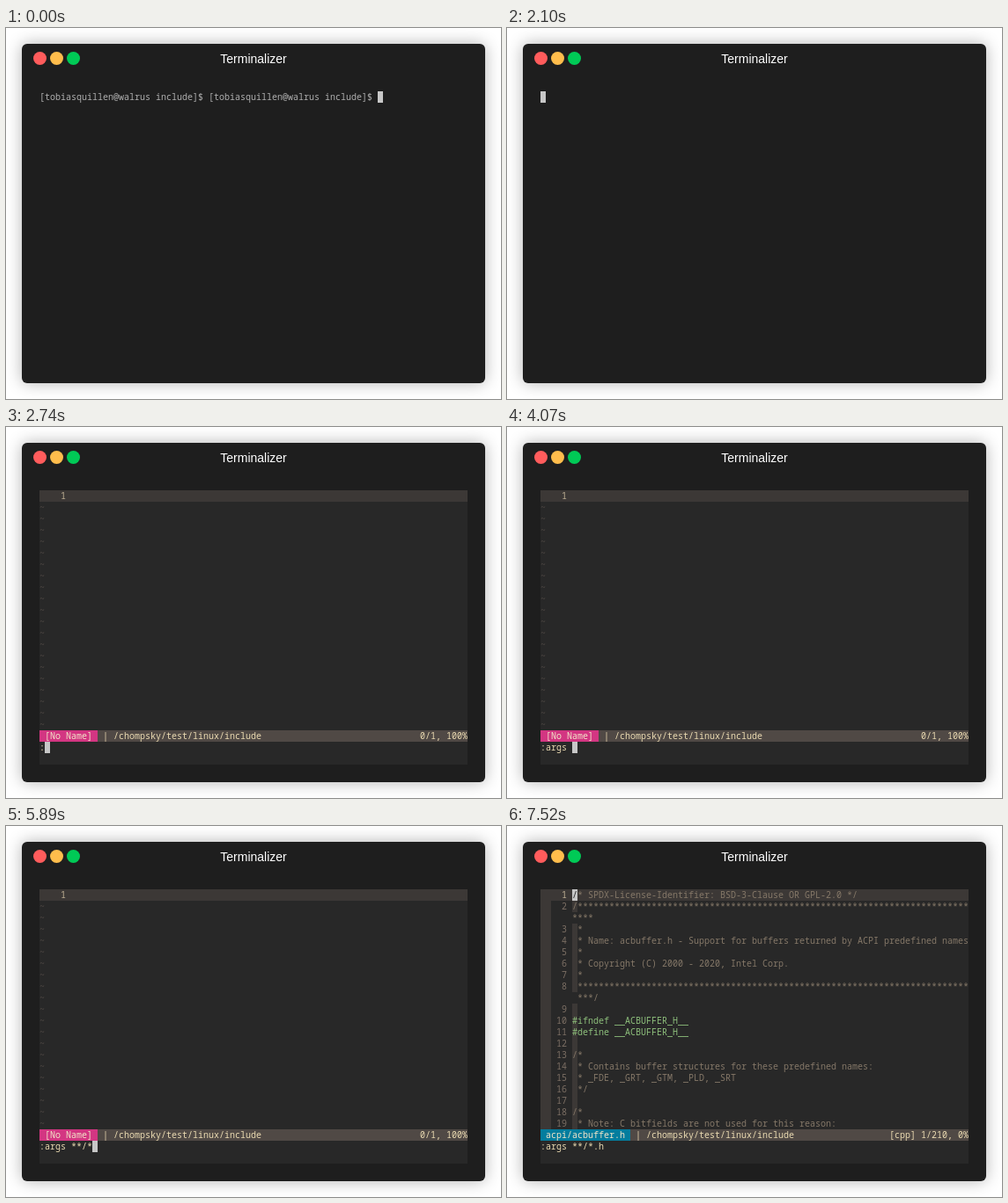
An HTML page for the animation above (8000 ms loop, 562x422 px).

```html
<!DOCTYPE html>
<html lang="en">
<head>
<meta charset="utf-8">
<title>Terminal</title>
<style>
  html, body { margin: 0; width: 100%; height: 100%; overflow: hidden; background: #fff; }
  #window {
    position: absolute; left: 18px; top: 18px; width: 526px; height: 386px;
    border-radius: 6px; background: #1e1e1e; box-shadow: 0 0 18px rgba(0, 0, 0, .3);
  }
  #window i { position: absolute; top: 9px; width: 15px; height: 15px; border-radius: 50%; }
  #title {
    position: absolute; left: 0; right: 0; top: 7px; text-align: center; color: #fff;
    font: 14px/20px "Liberation Sans", Arial, sans-serif;
  }
  #screen {
    position: absolute; left: 20px; top: 54px; width: 486px; height: 312px; overflow: hidden;
    font: 10px/13px "Noto Sans Mono", "DejaVu Sans Mono", monospace;
  }
  #screen span { position: absolute; height: 13px; white-space: pre; }
</style>
</head>
<body>
<div id="window">
  <i style="left:13px;background:#ff5c5c"></i>
  <i style="left:32px;background:#ffbd4c"></i>
  <i style="left:51px;background:#00ca56"></i>
  <div id="title">Terminalizer</div>
  <div id="screen"></div>
</div>
<script>
const LOOP = 8000, COLS = 81, CELL_W = 6, CELL_H = 13, STATUS_ROW = 21, CMD_ROW = 22;
const color = {
  shell: '#afafaf', cursor: '#c7c7c7', bg: '#282828', line: '#3c3836', bar: '#504945',
  text: '#ebdbb2', number: '#7c6f64', current: '#bdae93', comment: '#857868',
  macro: '#8ec07c', normal: '#047d9e', command: '#d33682'
};
const screen = document.getElementById('screen');

function put(row, col, text, ink) {
  const span = document.createElement('span');
  span.textContent = text;
  span.style.left = col * CELL_W + 'px';
  span.style.top = row * CELL_H + 'px';
  span.style.color = ink;
  screen.append(span);
  return span;
}

function fill(row, col, cols, rows, paint) {
  const box = put(row, col, '', paint);
  box.style.width = cols * CELL_W + 'px';
  box.style.height = rows * CELL_H + 'px';
  box.style.background = paint;
}

function cursor(row, col, char = '') {
  fill(row, col, 1, 1, color.cursor);
  put(row, col, char, color.bg);
}

function shell(typed) {
  const line = '[tobiasquillen@walrus include]$ '.repeat(2) + typed;
  put(0, 0, line, color.shell);
  return line.length;
}

function statusBar(name, position, paint) {
  const label = ` ${name} `;
  fill(STATUS_ROW, 0, COLS, 1, color.bar);
  fill(STATUS_ROW, 0, label.length, 1, paint);
  put(STATUS_ROW, 0, label, '#f2e5c8');
  put(STATUS_ROW, label.length, ' | /chompsky/test/linux/include', color.text);
  put(STATUS_ROW, COLS - position.length, position, color.text);
}

function editor() {
  fill(0, 0, COLS, 24, color.bg);
  fill(0, 0, COLS, 1, color.line);
}

function emptyBuffer(paint) {
  editor();
  put(0, 4, '1', color.current);
  for (let row = 1; row < STATUS_ROW; row++) put(row, 0, '~', color.bar);
  statusBar('[No Name]', '0/1, 100%', paint);
}

function commandLine(text) {
  emptyBuffer(color.command);
  put(CMD_ROW, 0, text, color.text);
}

// Each entry is one buffer line; a nested list holds its wrapped rows.
const stars = '*'.repeat(74);
const headerFile = [
  '/* SPDX-License-Identifier: BSD-3-Clause OR GPL-2.0 */',
  ['/' + stars, '****'],
  ' *',
  ' * Name: acbuffer.h - Support for buffers returned by ACPI predefined names',
  ' *',
  ' * Copyright (C) 2000 - 2020, Intel Corp.',
  ' *',
  [' ' + stars, ' ***/'],
  '',
  '#ifndef __ACBUFFER_H__',
  '#define __ACBUFFER_H__',
  '',
  '/*',
  ' * Contains buffer structures for these predefined names:',
  ' * _FDE, _GRT, _GTM, _PLD, _SRT',
  ' */',
  '',
  '/*',
  ' * Note: C bitfields are not used for this reason:'
];

function fileBuffer() {
  editor();
  fill(0, 0, 2, STATUS_ROW, color.line);
  let row = 0;
  headerFile.forEach((entry, index) => {
    put(row, 2, String(index + 1).padStart(3), index ? color.number : color.current);
    fill(row, 6, 1, 1, color.line);
    for (const text of [entry].flat())
      put(row++, 6, text, text[0] === '#' ? color.macro : color.comment);
  });
  statusBar('acpi/acbuffer.h', '[cpp] 1/210, 0%', color.normal);
  put(CMD_ROW, 0, ':args **/*.h', color.text);
  cursor(0, 6, '/');
}

const typeShell = text => () => cursor(0, shell(text));
const typeCommand = text => () => { commandLine(text); cursor(CMD_ROW, text.length); };
const typing = (text, times, type) =>
  times.map((time, i) => [time, type(text.slice(0, i + 1))]);

const steps = [
  [0, typeShell('')],
  ...typing('nvim', [1220, 1350, 1510, 1570], typeShell),
  [2000, () => { shell('nvim'); cursor(1, 0); }],
  [2100, () => cursor(0, 0)],
  [2210, () => { emptyBuffer(color.normal); cursor(0, 6); }],
  ...typing(':args **/*.h',
    [2740, 3250, 3500, 3810, 3890, 4070, 4450, 4610, 5010, 5890, 6270, 6560], typeCommand),
  [6850, () => { commandLine(':args **/*.h'); cursor(CMD_ROW, 0, ':'); }],
  [7520, fileBuffer]
];

let shown;
function tick() {
  const time = performance.now() % LOOP;
  const step = steps.findLast(([start]) => start <= time);
  if (step !== shown) {
    shown = step;
    screen.replaceChildren();
    step[1]();
  }
  requestAnimationFrame(tick);
}
tick();
</script>
</body>
</html>
```
